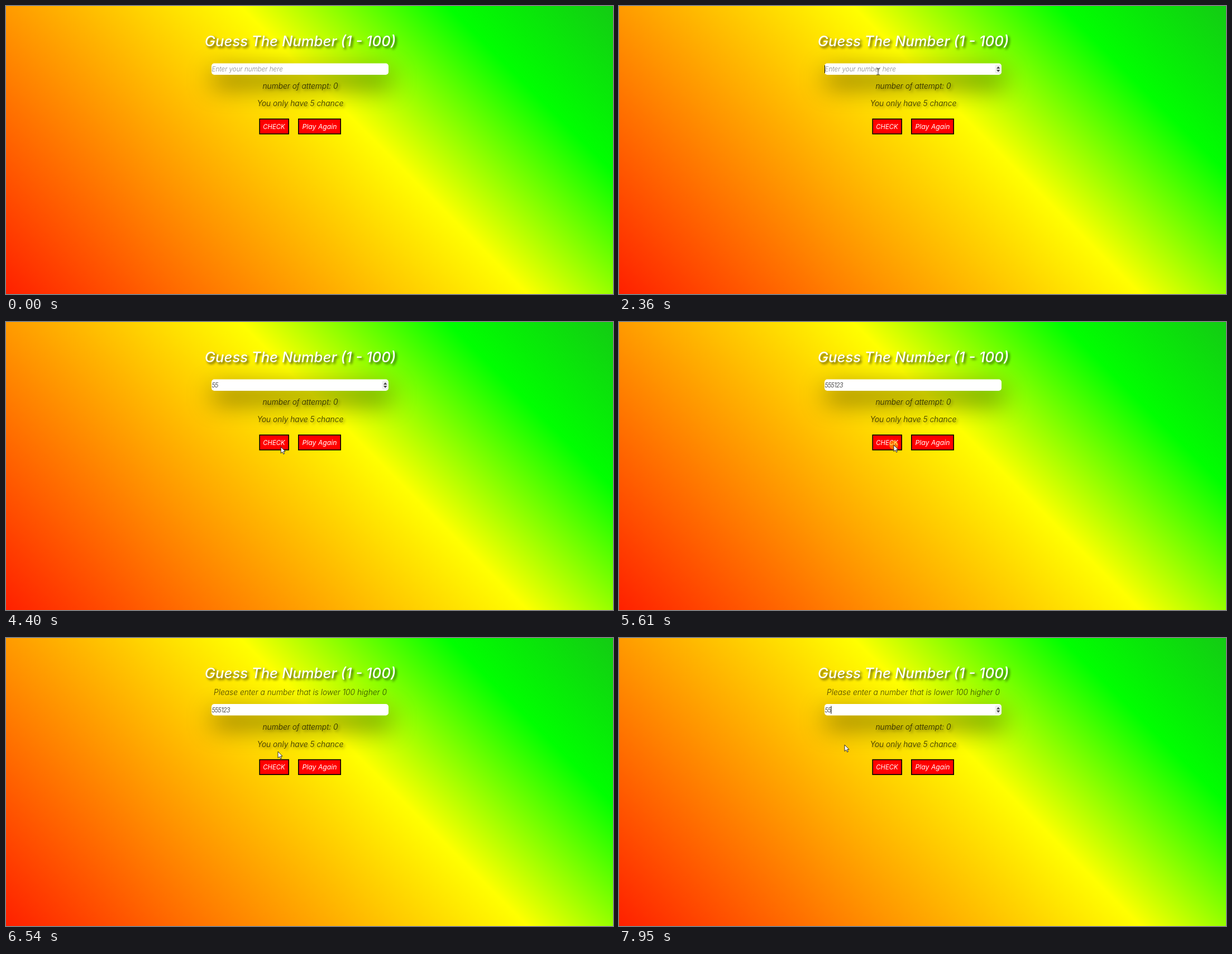
Recreate the animation shown at these times as an HTML page. Size 1087 px wide and 515 px high, loop 8 s.

```html
<!DOCTYPE html>
<html lang="en">
<head>
<meta charset="utf-8">
<title>Guess The Number</title>
<style>
  html, body { margin: 0; width: 100%; height: 100%; overflow: hidden; }
  body { background: linear-gradient(45deg, #ff2000, #ff0 58.3%, #0f0 81.5%, #14cb14); }
  svg { display: block; width: 100%; height: 100%; }
  text { font: italic 300 13.8px Inter, Lato, sans-serif; white-space: pre; fill: rgba(0,0,0,.8); }
  .center { text-anchor: middle; }
  .title { font-size: 25.7px; font-weight: 500; fill: #fff; filter: drop-shadow(3px 3px 2px rgba(0,0,0,.65)); }
  .shaded { filter: drop-shadow(3px 3px 2px rgba(0,0,0,.5)); }
  .message { fill: rgba(0,0,0,.7); }
  .glow { filter: blur(23px); fill: rgba(0,0,0,.66); }
  .placeholder { font-size: 11.6px; fill: #858585; }
  .value { font-size: 11px; letter-spacing: -.8px; }
  .button rect { fill: red; stroke: #000; stroke-width: 1.6; }
  .button text { font-size: 11.3px; font-weight: 400; fill: #fff; }
  .button .wide { font-size: 12.2px; }
</style>
</head>
<body>
<svg viewBox="0 0 1087 515" preserveAspectRatio="none">
  <text class="center title" x="527" y="72">Guess The Number (1 - 100)</text>
  <text id="message" class="center message" x="527" y="102">Please enter a number that is lower 100 higher 0</text>
  <g id="form">
    <rect class="glow" x="371" y="120.5" width="317" height="20.5"/>
    <rect x="368" y="102.5" width="317" height="20.5" rx="5" fill="#fff"/>
    <text id="placeholder" class="placeholder" x="368.5" y="117">Enter your number here</text>
    <rect id="selection" y="106" height="14" fill="#1e90ff"/>
    <text id="value" class="value" x="368.5" y="117"></text>
    <rect id="caret" y="106" width="1" height="14"/>
    <g id="spinner">
      <rect x="673.5" y="105" width="11" height="16" rx="2" fill="#efefef"/>
      <path d="M676 112l3.2-4 3.2 4zM676 114l3.2 4 3.2-4z" fill="#444"/>
    </g>
    <text class="center shaded" x="527" y="148">number of attempt: 0</text>
    <text class="center shaded" x="527" y="179">You only have 5 chance</text>
    <g class="button">
      <rect x="454.2" y="202.1" width="52" height="26.6"/>
      <text class="center" x="480" y="219.7">CHECK</text>
      <rect x="523.8" y="202.1" width="75.4" height="26.6"/>
      <text class="center wide" x="561.5" y="219.7">Play Again</text>
    </g>
  </g>
  <g id="pointer">
    <circle id="press" r="8" fill="rgba(255,220,0,.5)"/>
    <path id="arrow" d="M0 0V11.5L2.7 9 4.6 13 6.4 12.2 4.6 8.3H8z" fill="#fff" stroke="#000" stroke-width=".8"/>
    <path id="beam" d="M-3-5.5h2q1 0 1 1 0-1 1-1h2M0-4.5v9M-3 5.5h2q1 0 1-1 0 1 1 1h2" fill="none" stroke="#333"/>
  </g>
</svg>
<script>
const LOOP = 8000, STEP = 70, DIGIT = 5.7, LEFT = 368;
const $ = id => document.getElementById(id);

// Each move: rows of [time, x, y]; the pointer rests between moves.
const moves = [
  [[190, 877, 410], [400, 674, 262], [610, 524, 162], [820, 460, 124]],
  [[1090, 461, 122], [1300, 464, 117.5]],
  [[3370, 468, 132], [3510, 484, 194], [3720, 492, 226], [4000, 494, 238]],
  [[4190, 493, 233], [4470, 492, 220]],
  [[6540, 487, 203], [6680, 450, 162], [6820, 408, 129], [7100, 304, 122], [7170, 286, 120], [7310, 282, 120]],
  [[7380, 284, 121], [7520, 299, 125], [7940, 404, 191]]
];
const typing = [
  [0, ""], [2910, "5"], [3370, "55"], [4800, "555"], [5080, "5551"], [5210, "55512"],
  [5330, "555123"], [7590, "5"], [7800, "55"]
];

const within = (t, from, to) => t >= from && t < to;
const show = (id, on) => $(id).setAttribute("visibility", on ? "visible" : "hidden");

function pointerAt(time) {
  const move = moves.findLast(m => m[0][0] <= time);
  if (!move) return null;
  const start = move[0][0];
  const t = start + Math.floor((time - start) / STEP) * STEP;
  const i = move.findLastIndex(p => p[0] <= t);
  const a = move[i], b = move[i + 1];
  if (!b) return a.slice(1);
  const k = (t - a[0]) / (b[0] - a[0]);
  return [a[1] + (b[1] - a[1]) * k, a[2] + (b[2] - a[2]) * k];
}

function draw(t) {
  const moved = t >= 5750;
  show("message", moved);
  $("form").setAttribute("transform", `translate(0 ${moved ? 15.5 : 0})`);

  const [typedAt, value] = typing.findLast(row => row[0] <= t);
  const end = LEFT + value.length * DIGIT;
  $("value").textContent = value;
  show("placeholder", !value);

  const point = pointerAt(t);
  const selecting = within(t, 6890, 7590);
  const from = t >= 7170 ? LEFT : Math.max(LEFT, Math.min(end, point ? point[0] : end));
  $("selection").setAttribute("x", from);
  $("selection").setAttribute("width", selecting ? end - from : 0);
  $("value").style.fill = selecting && from < LEFT + 3 ? "#fff" : "#222";

  const focused = within(t, 1300, 5540) || t >= 7590;
  const blink = (t - Math.max(1300, typedAt)) % 1060 < 530;
  $("caret").setAttribute("x", end);
  show("caret", focused && blink);
  show("spinner", within(t, 680, 5540) || t >= 6820);

  show("press", within(t, 1300, 1440) || within(t, 5540, 5750) || within(t, 6890, 7240));
  $("pointer").setAttribute("display", point ? "inline" : "none");
  if (!point) return;
  $("pointer").setAttribute("transform", `translate(${point})`);
  const beam = within(t, 720, 3580) || within(t, 6820, 7030);
  show("beam", beam);
  show("arrow", !beam);
}

const origin = performance.now();
function tick() {
  draw((performance.now() - origin) % LOOP);
  requestAnimationFrame(tick);
}
tick();
</script>
</body>
</html>
```
